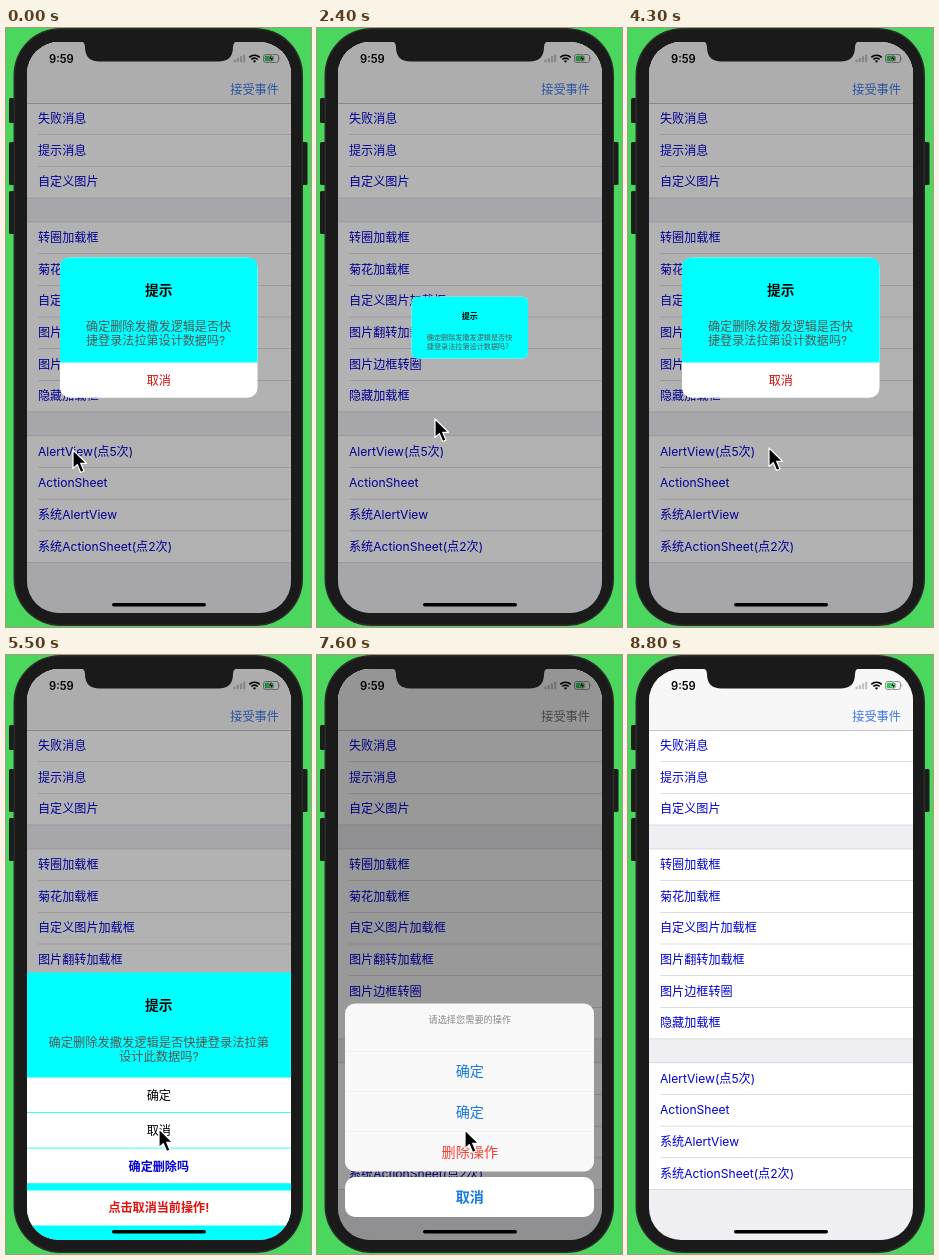
An HTML page for the animation above (8.9 s loop, 305 by 599 pixels).

```html
<!DOCTYPE html>
<html lang="zh-CN">
<head>
<meta charset="utf-8">
<title>弹窗演示</title>
<style>
html, body { margin: 0; width: 100%; height: 100%; overflow: hidden; background: #4bd65e; }
svg { display: block; width: 100%; height: 100%; }
text { font-family: Inter, "Noto Sans CJK SC", "Noto Sans CJK", sans-serif; }
</style>
</head>
<body>
<svg id="stage" viewBox="0 0 305 599"></svg>
<script>
const LOOP = 8900;
const BLUE = '#0000d2', RED = '#c8100c', CYAN = '#00ffff', IOS = '#167ae0';
const MID = 152.8;

const rect = (x, y, w, h, fill, rx = 0) =>
  `<rect x="${x}" y="${y}" width="${w}" height="${h}" rx="${rx}" fill="${fill}"/>`;
// y is the visual middle of the line
const label = (s, x, y, size, fill, anchor = 'start', weight = 400) =>
  `<text x="${x}" y="${y + size * .37}" font-size="${size}" fill="${fill}" text-anchor="${anchor}" font-weight="${weight}">${s}</text>`;
const mid = (s, y, size, fill, weight) => label(s, MID, y, size, fill, 'middle', weight);
const group = (id, body) => `<g id="${id}">${body}</g>`;

function section(top, rows) {
  const h = 31.65, bottom = top + rows.length * h;
  let out = rect(21, top, 264, bottom - top, '#fff');
  rows.forEach((s, i) => {
    const y = top + i * h;
    if (i) out += rect(32, y - .25, 253, .6, '#c8c7cc');
    out += label(s, 32, y + h / 2 - .3, 12.1, BLUE);
  });
  return out + rect(21, top - .3, 264, .6, '#c8c7cc') + rect(21, bottom - .3, 264, .6, '#c8c7cc');
}

function alertBox(id, head, buttons) {
  const h = 105 + 35.2 * buttons.length, top = 299.6 - h / 2;
  let body = rect(54, top, 197.5, h, '#fff', 10);
  if (head !== '#fff') {
    body += buttons.length
      ? `<path d="M54 ${top + 105}V${top + 10}q0-10 10-10H241.5q10 0 10 10V${top + 105}z" fill="${head}"/>`
      : rect(54, top, 197.5, h, head, 10);
  }
  body += mid('提示', top + 32.7, 13.7, '#000', 700);
  body += label('确定删除发撒发逻辑是否快', 80, top + 69.3, 12.1, '#555');
  body += label('捷登录法拉第设计数据吗?', 80, top + 83.5, 12.1, '#555');
  buttons.forEach(([s, fill, weight], i) => {
    const y = top + 105 + i * 35.2;
    if (head === '#fff') body += rect(54, y, 197.5, .4, '#ededed');
    body += mid(s, y + 17.6, 12.1, fill, weight);
  });
  return group(id, body);
}

function sheet() {
  let body = rect(21, 317.5, 264, 270, CYAN) + mid('提示', 350.3, 13.7, '#000', 700);
  body += mid('确定删除发撒发逻辑是否快捷登录法拉第', 387, 12.25, '#555');
  body += mid('设计此数据吗?', 401, 12.25, '#555');
  [['确定', '#000', 400], ['取消', '#000', 400], ['确定删除吗', BLUE, 700]].forEach(([s, fill, weight], i) => {
    const y = 422.5 + i * 35.5;
    body += rect(21, y, 264, 34.7, '#fff') + mid(s, y + 17.6, 12.1, fill, weight);
  });
  return body + rect(21, 535.5, 264, 35, '#fff') + mid('点击取消当前操作!', 553, 12.1, '#e0100c', 700);
}

function systemSheet() {
  let body = rect(28, 348.5, 249, 168, '#f8f8f8', 10) + mid('请选择您需要的操作', 364.5, 9.2, '#8a8a8a');
  [['确定', IOS], ['确定', IOS], ['删除操作', '#f5403a']].forEach(([s, fill], i) => {
    const y = 396 + i * 40.2;
    body += rect(28, y, 249, .4, '#e6e6e8') + mid(s, y + 20.1, 14.1, fill);
  });
  return body + rect(28, 522, 249, 40, '#fff', 10) + mid('取消', 542, 14.1, IOS, 600);
}

function statusBar() {
  let out = label('9:59', 43, 30.5, 11.2, '#000', 'start', 600);
  for (let i = 0; i < 4; i++) out += rect(227.5 + i * 3.2, 31.5 - i * 1.6, 2.2, 2.8 + i * 1.6, '#000" opacity=".22', .5);
  out += `<g fill="none" stroke="#000" stroke-width="1.7"><path d="M243.3 29.4a7.4 7.4 0 0 1 10.4 0M245.3 31.5a4.5 4.5 0 0 1 6.4 0"/></g>
    <path d="M246.9 33a2.3 2.3 0 0 1 3.2 0l-1.6 1.8z"/>
    <rect x="257.5" y="26.5" width="15" height="8" rx="2.2" fill="none" stroke="#777" stroke-width=".8"/>
    <path d="M273.6 29q1.4 1.5 0 3z" fill="#777"/>`;
  return out + rect(258.7, 27.7, 9, 5.6, '#35c759', 1.2) +
    '<path d="M266.3 26l-4 5h2.6l-1 4 4-5.2h-2.6z" fill="#000" stroke="#fff" stroke-width=".5"/>';
}

const sides = [[3, 70, 25], [3, 114, 43], [3, 163, 43], [295.5, 114, 43]]
  .map(([x, y, h]) => rect(x, y, 6, h, '#1a1d1a', 1.5)).join('');

document.getElementById('stage').innerHTML = `
  <defs><clipPath id="screen">${rect(21, 14, 264, 571, '#000', 32)}</clipPath></defs>
  ${rect(-100, -100, 505, 799, '#4bd65e')}
  ${sides}
  ${rect(7.5, 0, 289.5, 598, '#2b2d2b', 47)}
  ${rect(9, 1.5, 286.5, 595, '#191a19', 45.5)}
  <g clip-path="url(#screen)">
    ${rect(21, 14, 264, 571, '#efeff4')}
    ${section(75, ['失败消息', '提示消息', '自定义图片'])}
    ${section(194, ['转圈加载框', '菊花加载框', '自定义图片加载框', '图片翻转加载框', '图片边框转圈', '隐藏加载框'])}
    ${section(407.8, ['AlertView(点5次)', 'ActionSheet', '系统AlertView', '系统ActionSheet(点2次)'])}
    ${rect(21, 14, 264, 61, '#f7f7f8')}${rect(21, 75, 264, .7, '#b2b2b5')}
    ${group('nav', label('接受事件', 273, 61, 12.2, 'currentColor', 'end'))}
    ${statusBar()}
    <rect id="dim" x="21" y="14" width="264" height="571"/>
    ${alertBox('cyan', CYAN, [['取消', RED, 400]])}
    ${alertBox('white', '#fff', [['取消', RED, 400], ['我已了解', BLUE, 700], ['好的', BLUE, 400]])}
    ${alertBox('plain', CYAN, [])}
    ${group('sheet', sheet())}
    ${group('system', systemSheet())}
  </g>
  <path d="M73 13q6 0 6 6 0 14.500 14.500 14.500H212.500Q227 33.500 227 19q0-6 6-6z" fill="#191a19"/>
  ${rect(106, 575, 94, 3.6, '#000', 1.8)}
  <path id="cursor" d="M0 0V18.500L4.300 14.600 7.600 22.500 11 21 7.700 13.300H13.500Z" fill="#000" stroke="#fff" stroke-width="1.200" stroke-linejoin="round"/>`;

const $ = id => document.getElementById(id);
const ids = ['cyan', 'white', 'plain', 'sheet', 'system'];
const el = Object.fromEntries([...ids, 'dim', 'nav', 'cursor'].map(id => [id, $(id)]));

// panel, opens, closes
const shows = [
  ['cyan', -400, 560], ['white', 850, 1680], ['plain', 2261, 3050],
  ['cyan', 3600, 4650], ['sheet', 5000, 6020], ['system', 6650, 8050]
];
// time, x, y of the pointer tip
const track = [
  [0, 67, 422], [200, 67, 422], [480, 146, 354], [560, 146, 354], [800, 92, 421], [900, 94, 420],
  [1200, 123, 368], [1480, 138, 354], [1680, 138, 354], [2050, 112, 420], [2260, 114, 418],
  [2400, 118, 391], [3050, 119, 390], [3450, 130, 424], [3700, 135, 424], [4300, 141, 420],
  [4550, 148, 354], [4650, 148, 354], [4900, 90, 456], [5050, 90, 456], [5500, 153, 474],
  [6050, 153, 474], [6500, 118, 520], [6750, 118, 520], [7200, 148, 475], [7650, 148, 475],
  [7950, 150, 542], [8300, 150, 542]
];

const clamp = v => Math.max(0, Math.min(1, v));
const smooth = v => v * v * (3 - 2 * v);
const zoom = s => `translate(${MID} 299.6) scale(${s}) translate(${-MID} -299.6)`;

function draw(t) {
  let dim = 0, tint = '#3f78e6';
  ids.forEach(id => el[id].style.display = 'none');
  for (const [id, from, to] of shows) {
    if (t < from || t >= to + 250) continue;
    const p = clamp((t - from) / 250), q = clamp((t - to) / 250);
    const g = el[id];
    g.style.display = '';
    if (id === 'sheet' || id === 'system') {
      const off = 1 - smooth(p) + smooth(q);
      g.setAttribute('transform', `translate(0 ${off * 270})`);
      dim = (id === 'system' ? .4 : .3) * (1 - off);
      if (id === 'system' && q === 0) tint = '#777';
    } else {
      g.setAttribute('transform', zoom(smooth(p)));
      g.setAttribute('opacity', 1 - q);
      dim = .3 * clamp(p * 2) * (1 - q);
    }
  }
  el.dim.setAttribute('opacity', dim);
  el.nav.style.color = tint;

  const i = Math.max(1, track.findIndex(k => k[0] > t));
  const [t0, x0, y0] = track[i - 1], [t1, x1, y1] = track[i];
  const k = smooth(clamp((t - t0) / (t1 - t0)));
  el.cursor.setAttribute('transform', `translate(${x0 + (x1 - x0) * k} ${y0 + (y1 - y0) * k})`);
  el.cursor.style.display = t < 8300 ? '' : 'none';
}

const start = performance.now();
function tick() {
  draw((performance.now() - start) % LOOP);
  requestAnimationFrame(tick);
}
tick();
</script>
</body>
</html>
```
